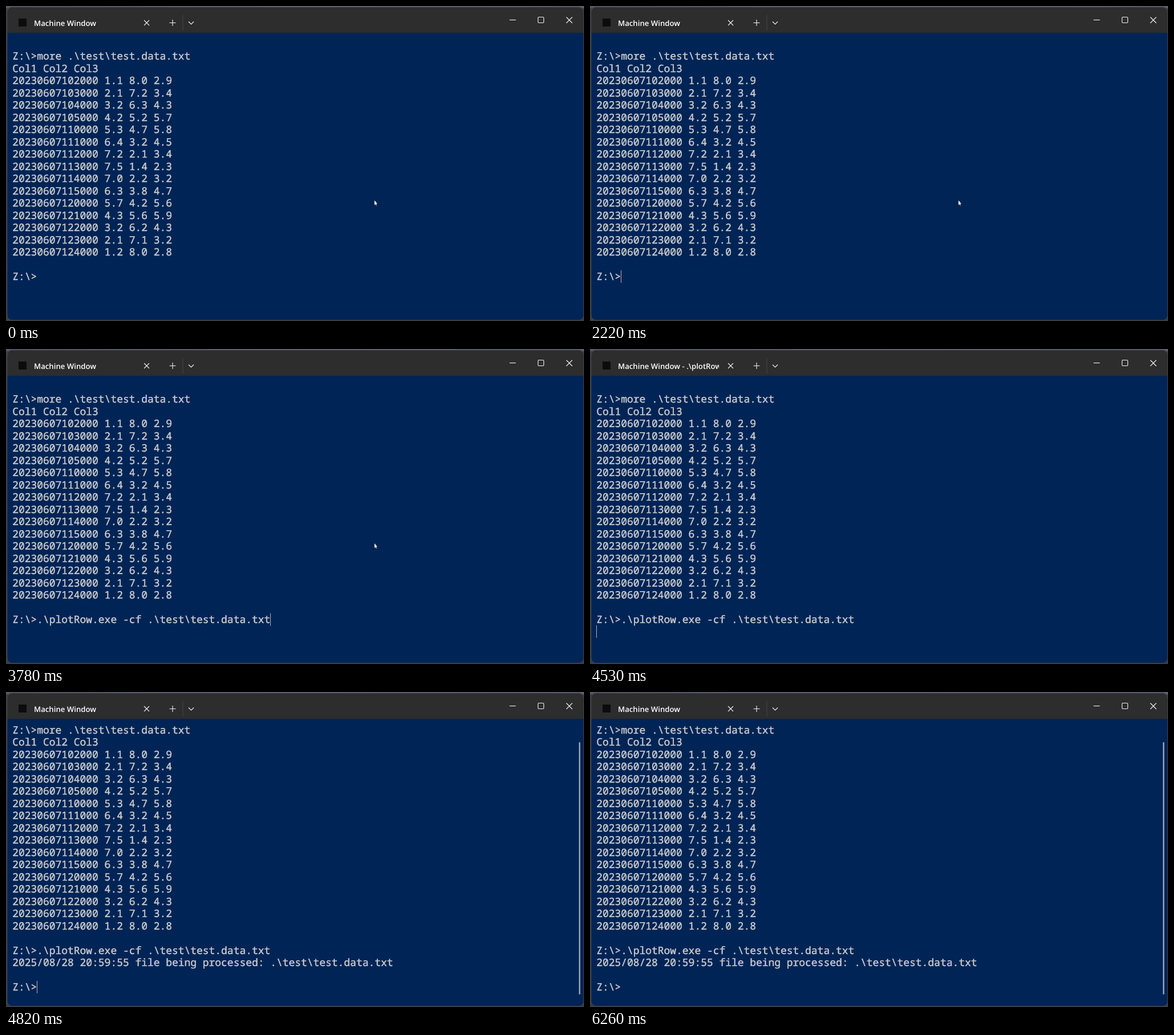
Animation of 1013 by 553 pixels, one loop 8 s. Source, as an HTML page:

```html
<!DOCTYPE html>
<html lang="en">
<head>
<meta charset="utf-8">
<title>Terminal session</title>
<style>
  html, body { margin: 0; width: 100%; height: 100%; overflow: hidden; background: #3c3d42; }
  svg { display: block; width: 1013px; height: 553px; }
  text { white-space: pre; text-rendering: geometricPrecision; }
  #rows text {
    font: 17.96px "Noto Sans Mono", "DejaVu Sans Mono", monospace;
    fill: #ccc; stroke: #ccc; stroke-width: .45;
  }
  #title { font: 600 13.2px "Open Sans", "Noto Sans", sans-serif; fill: #fff; }
  .icon { fill: none; stroke: #f2f2f2; stroke-width: 1.1; }
</style>
</head>
<body>
<svg viewBox="0 0 1013 553">
  <defs>
    <linearGradient id="edge">
      <stop offset="0" stop-color="#55586a"/>
      <stop offset=".5" stop-color="#686a80"/>
      <stop offset="1" stop-color="#5c5f76"/>
    </linearGradient>
    <clipPath id="win"><rect x="2.5" y="2.5" width="1009.5" height="548.5" rx="8"/></clipPath>
    <clipPath id="label"><rect x="45" y="18" width="181" height="26"/></clipPath>
  </defs>

  <rect width="1013" height="553" fill="#3c3d42"/>
  <rect width="1013" height="4" fill="url(#edge)"/>
  <rect x="1.5" y="1.5" width="1011" height="550" rx="8.5" fill="#46474b"/>
  <g clip-path="url(#win)">
    <rect width="1013" height="47" fill="#2d2d2d"/>
    <rect y="47" width="1013" height="506" fill="#012456"/>
  </g>

  <rect x="22" y="22" width="14" height="14" fill="#0c0c0c"/>
  <g clip-path="url(#label)"><text id="title" x="49" y="35"></text></g>
  <path d="M310 16V43" stroke="#464646"/>
  <g class="icon">
    <path d="M242 25l9 9M251 25l-9 9"/>
    <path d="M286.5 29.5h11M292 24v11"/>
    <path d="M320 27.5l4.5 4.5l4.5-4.5"/>
    <path d="M882.5 24.5h11"/>
    <rect x="932.5" y="19.5" width="10" height="10" rx="1.5"/>
    <path d="M982 19.500l10.500 10.500M992.500 19.500l-10.500 10.500"/>
  </g>

  <g id="rows"></g>
  <rect id="caret" width="1" height="22" fill="#aeb0b0"/>
  <rect id="bar" x="1004" y="88" width="2.500" height="443" rx="1.200" fill="#9a9fac"/>
  <path id="pointer" d="M645.500 340.500v9.500l2-1.800l1.500 2.600l1.300-.7l-1.300-2.600h2.400z"
        fill="#fff" stroke="#111" stroke-width=".6"/>
</svg>
<script>
  const LOOP = 8000;
  const X = 11.2, TOP = 55.8, PITCH = 21.5, ASCENT = 17.1, CELL = 10.775;
  const $ = id => document.getElementById(id);

  const APP = "Machine Window";
  const FILE = ".\\test\\test.data.txt";
  const COMMAND = ".\\plotRow.exe -cf " + FILE;
  const values = [
    "102000 1.1 8.0 2.9", "103000 2.1 7.2 3.4", "104000 3.2 6.3 4.3",
    "105000 4.2 5.2 5.7", "110000 5.3 4.7 5.8", "111000 6.4 3.2 4.5",
    "112000 7.2 2.1 3.4", "113000 7.5 1.4 2.3", "114000 7.0 2.2 3.2",
    "115000 6.3 3.8 4.7", "120000 5.7 4.2 5.6", "121000 4.3 5.6 5.9",
    "122000 3.2 6.2 4.3", "123000 2.1 7.1 3.2", "124000 1.2 8.0 2.8"
  ];
  const listing = ["Z:\\>more " + FILE, "Col1 Col2 Col3", ...values.map(v => "20230607" + v), ""];
  const typed = [...listing, "Z:\\>" + COMMAND];
  const logged = [...typed, "2025/08/28 20:59:55 file being processed: " + FILE];

  const screens = {
    idle: { lines: ["", ...listing, "Z:\\>"], pointer: true },
    typed: { lines: ["", ...typed], pointer: true },
    running: { lines: ["", ...typed], busy: true },
    logged: { lines: ["", ...logged], busy: true },
    done: { lines: [...logged, "", "Z:\\>"], bar: true }
  };

  // start time, screen, caret [column, row] when lit
  const steps = [
    [0, "idle"],
    [1340, "idle", [4, 19]],
    [1870, "idle"],
    [2220, "idle", [4, 19]],
    [2470, "typed", [42, 19]],
    [3150, "typed"],
    [3780, "typed", [42, 19]],
    [4280, "typed"],
    [4530, "running", [0, 20]],
    [4680, "logged", [0, 21]],
    [4820, "done", [4, 21]],
    [5230, "done"],
    [5740, "done", [4, 21]],
    [6260, "done"]
  ];

  const rows = Array.from({ length: 22 }, (_, i) => {
    const row = document.createElementNS("http://www.w3.org/2000/svg", "text");
    row.setAttribute("x", X);
    row.setAttribute("y", TOP + ASCENT + i * PITCH);
    return $("rows").appendChild(row);
  });

  const show = (id, on) => { $(id).style.display = on ? "" : "none"; };

  function render([, name, caret]) {
    const screen = screens[name];
    rows.forEach((row, i) => { row.textContent = screen.lines[i] || ""; });
    $("title").textContent = APP + (screen.busy ? " - " + COMMAND : "");
    show("pointer", screen.pointer);
    show("bar", screen.bar);
    show("caret", caret);
    if (caret) {
      $("caret").setAttribute("x", Math.floor(X + caret[0] * CELL));
      $("caret").setAttribute("y", Math.floor(TOP + caret[1] * PITCH));
    }
  }

  const start = performance.now();
  let current;
  function tick() {
    const t = (performance.now() - start) % LOOP;
    const step = steps.findLast(s => s[0] <= t);
    if (step !== current) render(current = step);
    requestAnimationFrame(tick);
  }
  tick();
</script>
</body>
</html>
```
